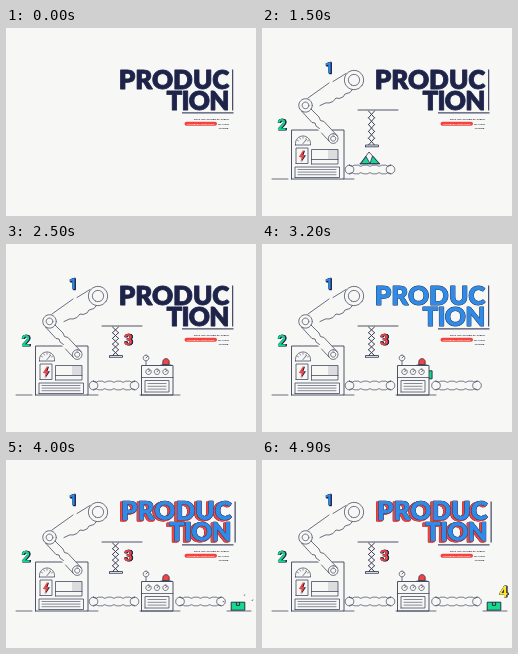
An HTML page with a canvas for the animation above (5000 ms loop, 250 by 188 pixels).

```html
<!DOCTYPE html>
<html lang="en">
<head>
<meta charset="utf-8">
<title>Production</title>
<style>
html, body { margin: 0; width: 100%; height: 100%; overflow: hidden; background: #f7f7f5; }
canvas { display: block; width: 250px; height: 188px; }
</style>
</head>
<body>
<canvas id="stage"></canvas>
<script>
const W = 250, H = 188, LOOP = 5000;
const BG = '#f7f7f5', NAVY = '#1d2349', INK = '#3c4158', BLUE = '#2f8be6',
  GREEN = '#16d98b', RED = '#f2453f', YELLOW = '#ffe52e', GREY = '#dcdce0';
const canvas = document.getElementById('stage');
const ctx = canvas.getContext('2d');
const dpr = window.devicePixelRatio || 1;
canvas.width = W * dpr;
canvas.height = H * dpr;
let now = 0;

const clamp = v => Math.max(0, Math.min(1, v));
const span = (a, b) => clamp((now - a) / (b - a));
const smooth = u => u * u * (3 - 2 * u);
const mix = (a, b, u) => a + (b - a) * u;
const backOut = u => 1 + 2.7 * (u - 1) ** 3 + 1.7 * (u - 1) ** 2;

function arc(x, y, r, from = -Math.PI / 2, to = from + Math.PI * 2) {
  return Array.from({ length: 33 }, (_, i) => {
    const a = mix(from, to, i / 32);
    return [x + r * Math.cos(a), y + r * Math.sin(a)];
  });
}

const box = (x, y, w, h) => [[x, y + h], [x, y], [x + w, y], [x + w, y + h], [x, y + h]];

function trace(pts) {
  ctx.beginPath();
  pts.forEach(p => ctx.lineTo(p[0], p[1]));
}

function fill(pts, color) {
  trace(pts);
  ctx.fillStyle = color;
  ctx.fill();
}

// Strokes a polyline that grows from its first point.
function draw(pts, from, to, width = 0.75, color = INK) {
  const u = smooth(span(from, to));
  if (!u) return;
  let left = u * pts.reduce((sum, p, i) =>
    i ? sum + Math.hypot(p[0] - pts[i - 1][0], p[1] - pts[i - 1][1]) : 0, 0);
  ctx.beginPath();
  ctx.moveTo(...pts[0]);
  for (let i = 1; i < pts.length && left > 0; i++) {
    const [a, b] = [pts[i - 1], pts[i]];
    const len = Math.hypot(b[0] - a[0], b[1] - a[1]) || 1e-6;
    const k = Math.min(1, left / len);
    ctx.lineTo(mix(a[0], b[0], k), mix(a[1], b[1], k));
    left -= len;
  }
  ctx.strokeStyle = color;
  ctx.lineWidth = width;
  ctx.stroke();
}

function outline(pts, color, width = 0.75) {
  fill(pts, color);
  ctx.strokeStyle = NAVY;
  ctx.lineWidth = width;
  ctx.stroke();
}

function titleLayer(dx, dy, color, width) {
  ctx.strokeStyle = ctx.fillStyle = color;
  ctx.lineWidth = width;
  [['PRODUC', 61.2, 0], ['TION', 82.2, -0.8]].forEach(([word, y, spacing]) => {
    ctx.letterSpacing = spacing + 'px';
    ctx.strokeText(word, 223.4 + spacing + dx, y + dy);
    ctx.fillText(word, 223.4 + spacing + dx, y + dy);
  });
  ctx.letterSpacing = '0px';
}

function title() {
  const tint = smooth(span(2600, 3050));
  const lift = smooth(span(3300, 3800));
  const dx = 2.4 * lift, dy = -0.8 * lift;
  ctx.font = '900 26px Lato, sans-serif';
  ctx.textAlign = 'right';
  titleLayer(0, 0, NAVY, 0.8);
  if (lift) {
    for (let k = 0; k <= 1; k += 0.2) titleLayer(k * dx, k * dy, RED, 0.3);
    titleLayer(dx, dy, NAVY, 0.7);
  }
  if (tint) {
    ctx.globalAlpha = tint;
    titleLayer(dx, dy, BLUE, 0.2);
    ctx.globalAlpha = 1;
  }
  ctx.fillStyle = NAVY;
  ctx.fillRect(226.2 + dx, 41.5, 1, 41);
  ctx.fillRect(176, 84.4, 51.5, 1);
}

function caption() {
  ctx.font = '700 2.45px Lato, sans-serif';
  ctx.textAlign = 'right';
  ctx.fillStyle = NAVY;
  ctx.fillText('CRAS NON MAURIS ET TURPIS', 222.8, 92.4);
  ctx.fillText('EU VITAE', 222.8, 96.8);
  ctx.fillText('TINCIDE.', 222.8, 101);
  ctx.fillStyle = RED;
  ctx.beginPath();
  ctx.roundRect(178.5, 93.8, 32.5, 4, 2);
  ctx.fill();
  ctx.textAlign = 'center';
  ctx.fillStyle = '#fff';
  ctx.fillText('PHARETRA COMMODO', 194.8, 96.8);
}

function numeral(char, x, y, color, start) {
  const u = span(start, start + 300);
  if (!u) return;
  const s = Math.max(0, backOut(u));
  ctx.save();
  ctx.translate(x, y);
  ctx.scale(s, s);
  ctx.font = '700 15.5px Roboto, sans-serif';
  ctx.textAlign = 'center';
  ctx.strokeStyle = ctx.fillStyle = NAVY;
  ctx.lineWidth = 0.6;
  for (let d = 0; d <= 1.2; d += 0.4) {
    ctx.strokeText(char, d, 5.3 + d / 3);
    ctx.fillText(char, d, 5.3 + d / 3);
  }
  ctx.fillStyle = color;
  ctx.fillText(char, -0.2, 5.3);
  ctx.restore();
}

function arm() {
  if (now > 900) {
    fill([[39, 82], [66, 113], [75, 107], [49, 80]], BG);
    fill(arc(71.2, 110.6, 4.8), BG);
  }
  draw([[39.5, 83], [50, 94.5], [53, 95], [54, 98], [57.5, 100.5]], 800, 1150);
  draw([[59.5, 105], [67, 113]], 1000, 1200);
  draw([[49, 81], [57, 89], [58.5, 92.5], [62, 93.5], [75, 107.5]], 850, 1250);
  draw(arc(71.2, 110.6, 4.8), 1000, 1300);
  draw(arc(71.2, 110.6, 2.5), 1050, 1300);
  draw([[84, 45.5], [71, 53.5]], 720, 900);
  draw([[67, 55], [46, 70]], 820, 1050);
  draw([[90, 62], [88, 64.5], [83, 66], [81, 69], [77, 70.5], [74, 70],
    [71, 73.5], [67, 75], [64, 74.8], [58, 77.5]], 350, 980);
  draw(arc(92, 52, 9.6, 0.6), 80, 480);
  draw(arc(92, 52, 5.6, 2), 180, 550);
  draw(arc(43.5, 77.4, 6.7, 0), 450, 700);
  draw(arc(43.5, 77.4, 3.3, 0), 450, 690);
}

function firstMachine() {
  if (now > 1250) fill(box(66, 122, 10, 9), GREY);
  draw(box(29.5, 102, 52.5, 49), 850, 1250, 0.9);
  draw([[26, 151], [10, 151]], 900, 1250);
  draw([[82, 151], [92, 151]], 1000, 1300);
  draw([[33.5, 117], ...arc(41, 115.5, 7.5, Math.PI, 2 * Math.PI), [48.5, 117], [33.5, 117]], 1000, 1300);
  for (let i = 1; i < 6; i++) {
    const a = Math.PI * (1 + i / 6), c = Math.cos(a), s = Math.sin(a);
    draw([[41 + 5 * c, 115.5 + 5 * s], [41 + 6.5 * c, 115.5 + 6.5 * s]], 1150, 1300, 0.5);
  }
  draw([[41, 115.5], [44.5, 111.5]], 1150, 1300);
  draw(box(34, 120, 12, 15.5), 1000, 1300);
  if (now > 1200) {
    const bolt = [[40.8, 122.5], [36.8, 129], [39.6, 129], [38.4, 134], [43, 127], [40.4, 127], [42, 122.5]];
    fill(bolt.map(([x, y]) => [x + 1, y + 0.3]), NAVY);
    fill(bolt, RED);
  }
  draw(box(49.5, 121.5, 26.5, 14.5), 1050, 1350);
  draw([[49.5, 131.5], [76, 131.5]], 1100, 1350);
  draw(box(33, 139, 44.5, 10.5), 1050, 1350);
  for (let y = 141.5; y < 149; y += 2.6) draw([[36, y], [74, y]], 1100, 1380, 0.6);
}

function press() {
  const down = smooth(span(1500, 1700)) - smooth(span(1750, 1950));
  const bottom = mix(117, 111.5, smooth(span(1750, 2000))) + 8 * down;
  const grow = smooth(span(1200, 1480));
  draw([[96, 82], [136, 82]], 1150, 1400, 0.9);
  if (!grow) return;
  const end = mix(84, bottom, grow), step = (end - 83) / 5;
  for (let i = 0; i < 5; i++) {
    const y = 83 + i * step;
    draw([[106.5, y], [112.5, y + step]], 1200, 1210, 1);
    draw([[112.5, y], [106.5, y + step]], 1200, 1210, 1);
  }
  outline(box(103.5, end, 13, 1.8), BG);
}

function conveyor(x, start) {
  const end = start + 350;
  [4.5, 45.5].forEach(dx => draw(arc(x + dx, 141.5, 4.3), start, end));
  const ridge = (y, side) => {
    const pts = [];
    for (let i = 0; i <= 64; i++) {
      const dip = Math.max(0, Math.sin(i / 64 * Math.PI * 9));
      pts.push([x + 4.5 + 41 * i / 64, y + side * dip]);
    }
    return pts;
  };
  draw(ridge(137.2, 1), start, end);
  draw(ridge(145.8, -1), start, end);
}

function secondMachine() {
  if (now > 1950) fill(box(135.5, 121.5, 31.5, 29.5), BG);
  draw(box(135.5, 121.5, 31.5, 29.5), 1800, 2200, 0.9);
  draw([[134, 151], [174, 151]], 1850, 2200);
  draw([[140, 121], [140, 117]], 1950, 2200);
  draw(arc(140, 114, 2.8), 1950, 2300);
  draw([[140, 114], [141.6, 112.4]], 2100, 2300);
  [142.5, 151, 159.5].forEach((x, i) => {
    draw(arc(x, 127.8, 2.7), 1950 + i * 60, 2250 + i * 60);
    draw([[x, 127.8], [x + 1.4, 126.2]], 2100, 2350);
  });
  draw([[135.5, 133.5], [167, 133.5]], 1950, 2250);
  draw(box(139, 136.5, 24, 11.5), 2000, 2350);
  for (let y = 139.5; y < 147; y += 2.8) draw([[142, y], [160, y]], 2050, 2400, 0.6);
  if (now > 2150) {
    const s = backOut(span(2150, 2400));
    outline([[156.8, 120.5], ...arc(160, 117.8, 3.2 * s, Math.PI, 2 * Math.PI), [163.2, 120.5], [156.8, 120.5]], RED);
    draw([[155, 121], [165, 121]], 2150, 2250, 0.9);
  }
}

function parcel(x, y) {
  outline(box(x - 6.8, y - 4, 13.6, 8), GREEN, 0.9);
  trace([[x - 1.6, y - 3.8], [x - 1.6, y - 0.8], [x + 1.6, y - 0.8], [x + 1.6, y - 3.8]]);
  ctx.stroke();
}

function cargo() {
  if (now > 1300 && now < 1680) {
    const s = backOut(span(1300, 1480));
    ctx.save();
    ctx.translate(108, 136);
    ctx.scale(s, s);
    outline([[-10, 0], [-1, -12], [10, 0], [-10, 0]], BG);
    outline([[-9, -0.5], [-4, -7.5], [0, -0.5], [-9, -0.5]], GREEN);
    outline([[0, -0.5], [2.5, -8], [9, -0.5], [0, -0.5]], GREEN);
    ctx.restore();
  } else if (now >= 1680 && now < 2480) {
    parcel(mix(108, 148, smooth(span(1880, 2450))), 132);
  } else if (now > 2980) {
    const u = span(2980, 3480), fall = span(3480, 3600);
    parcel(mix(150, 218, u * u) + 14 * fall, mix(130.8, 146.2, fall * fall));
  }
}

function landing() {
  draw([[221, 151], [245, 151]], 3500, 3850);
  const u = span(3620, 4250);
  if (u > 0 && u < 1) {
    [[-1, -0.3], [0.45, -0.75], [1, -0.4]].forEach(([dx, dy]) => {
      const a = 8 + 10 * u, b = a + 2.2 * (1 - u);
      draw([[232 + a * dx, 146 + a * dy], [232 + b * dx, 146 + b * dy]], 3600, 3610, 0.8);
    });
  }
}

function render(t) {
  now = t;
  ctx.setTransform(dpr, 0, 0, dpr, 0, 0);
  ctx.fillStyle = BG;
  ctx.fillRect(0, 0, W, H);
  ctx.lineJoin = ctx.lineCap = 'round';
  title();
  caption();
  firstMachine();
  arm();
  conveyor(83, 1080);
  conveyor(169.5, 2600);
  cargo();
  press();
  secondMachine();
  landing();
  numeral('1', 67.2, 40, BLUE, 500);
  numeral('2', 20, 96.3, GREEN, 1050);
  numeral('3', 122.5, 95.5, RED, 2150);
  numeral('4', 241.6, 131.3, YELLOW, 4300);
}

const start = performance.now();
function frame() {
  render((performance.now() - start) % LOOP);
  requestAnimationFrame(frame);
}
frame();
</script>
</body>
</html>
```
